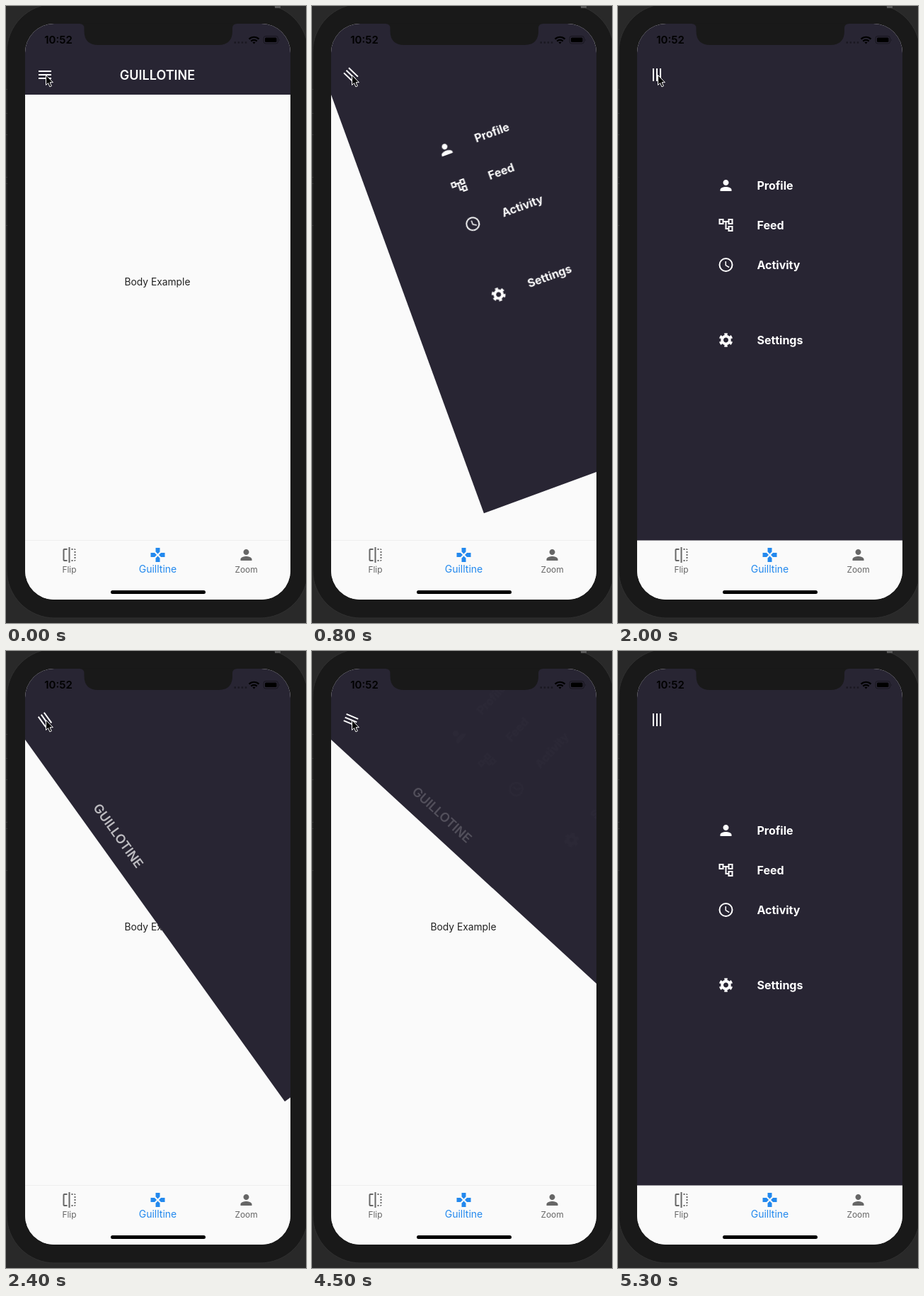
Recreate the animation shown at these times as an HTML page. Size 424 by 870 pixels, loop 5.8 s.

```html
<!DOCTYPE html>
<html lang="en">
<head>
<meta charset="utf-8">
<title>Guillotine menu</title>
<style>
html, body { margin: 0; width: 100%; height: 100%; overflow: hidden; background: #292929; }
svg { display: block; font-family: Inter, Roboto, sans-serif; }
.mid { text-anchor: middle; }
.items { fill: #fff; font-size: 16px; font-weight: 700; }
.tab { fill: #666; font-size: 11.9px; }
</style>
</head>
<body>
<svg width="424" height="870" viewBox="0 0 424 870">
  <defs>
    <clipPath id="screen"><rect x="27" y="25" width="375" height="812" rx="41"/></clipPath>
    <!-- icons are centred on the origin -->
    <path id="person" transform="translate(-12 -12)" d="M12 12c2.21 0 4-1.79 4-4s-1.79-4-4-4-4 1.79-4 4 1.79 4 4 4zm0 2c-2.67 0-8 1.34-8 4v2h16v-2c0-2.66-5.33-4-8-4z"/>
    <path id="tree" transform="translate(-12 -12)" d="M22 11V3h-7v3H9V3H2v8h7V8h2v10h4v3h7v-8h-7v3h-2V8h2v3h7zM7 9H4V5h3v4zm10 6h3v4h-3v-4zm0-10h3v4h-3V5z"/>
    <g id="clock" fill="none" stroke="#fff">
      <circle r="9" stroke-width="2"/>
      <path d="M-.25-5V.6L4.6 3.5" stroke-width="1.5"/>
    </g>
    <g id="gear" fill="none" stroke="#fff">
      <circle r="5.4" stroke-width="3.8"/>
      <circle r="8.2" stroke-width="3.2" pathLength="12" stroke-dasharray="1 1" stroke-dashoffset="-.5"/>
    </g>
    <path id="gamepad" transform="translate(-12 -12)" d="M15 7.5V2H9v5.5l3 3 3-3zM7.5 9H2v6h5.5l3-3-3-3zM9 16.5V22h6v-5.5l-3-3-3 3zM16.5 9l-3 3 3 3H22V9h-5.5z"/>
    <path id="flip" transform="translate(-12 -12)" d="M15 21h2v-2h-2v2zm4-12h2V7h-2v2zM3 5v14c0 1.1.9 2 2 2h4v-2H5V5h4V3H5c-1.1 0-2 .9-2 2zm16-2v2h2c0-1.1-.9-2-2-2zm-8 20h2V1h-2v22zm8-6h2v-2h-2v2zM15 5h2V3h-2v2zm4 8h2v-2h-2v2zm0 8c1.1 0 2-.9 2-2h-2v2z"/>
  </defs>

  <rect width="424" height="870" fill="#292929"/>
  <rect x="1" y="-3" width="426" height="866" rx="68" fill="#191919" stroke="#303030"/>
  <path d="M0 117.5h2M0 151.5h2M0 181.5h2M0 241.5h2M0 250.5h2M0 309.5h2" stroke="#3a3a3a"/>
  <rect x="380" width="8" height="3" fill="#555"/>

  <g clip-path="url(#screen)">
    <rect x="27" y="25" width="375" height="812" fill="#fafafa"/>
    <text class="mid" x="214" y="394" font-size="13.8" fill="#212121">Body Example</text>
    <path d="M27 753.5h375" stroke="#eee"/>
    <g id="panel">
      <rect x="27" y="25" width="375" height="728.5" fill="#282533"/>
      <text id="title" class="mid" transform="rotate(90 27 125)" x="214" y="103.5" font-size="18" font-weight="600" fill="#fff">GUILLOTINE</text>
      <g id="items" class="items">
        <use href="#person" x="152.5" y="253"/><text x="196.5" y="259">Profile</text>
        <use href="#tree" x="152.5" y="309"/><text x="196.5" y="315">Feed</text>
        <use href="#clock" x="152.5" y="365"/><text x="196.5" y="371">Activity</text>
        <use href="#gear" x="152.5" y="471"/><text x="196.5" y="477">Settings</text>
      </g>
    </g>
    <path id="burger" d="M46 92h18M46 97h18M46 102h18" stroke="#fff" stroke-width="2"/>

    <rect x="27" y="754" width="375" height="83" fill="#fafafa"/>
    <g class="tab mid">
      <use href="#flip" x="89.5" y="774"/><text x="89.5" y="799">Flip</text>
      <use href="#person" x="339.5" y="774"/><text x="339.5" y="799">Zoom</text>
      <g fill="#2389ee"><use href="#gamepad" x="214.5" y="774"/><text x="214.5" y="798.5" font-size="14">Guilltine</text></g>
    </g>
    <rect x="148" y="824" width="134" height="5" rx="2.5"/>

    <text class="mid" x="74" y="53" font-size="15" font-weight="600">10:52</text>
    <path d="M322.5 51.5h18" stroke="#000" stroke-opacity=".35" stroke-width="2.5" stroke-dasharray="2.5 2.6"/>
    <g fill="none" stroke="#000" stroke-width="2.2">
      <path d="M343.5 46.6a10 10 0 0 1 14 0M346.3 49.6a6 6 0 0 1 8.4 0"/>
      <path d="M348.5 51.3a3 3 0 0 1 4 0l-2 2.2z" fill="#000" stroke="none"/>
    </g>
    <rect x="364" y="42.5" width="20.5" height="10.5" rx="3" fill="none" stroke="#000" stroke-opacity=".4"/>
    <rect x="366" y="44.5" width="16.5" height="6.5" rx="1.5"/>
    <path d="M386 46v4q1.5-2 0-4z" fill-opacity=".45"/>
  </g>
  <path d="M104 24.5v.5q6.500 0 6.500 6.500V35q0 20 20 20H300q20 0 20-20V31.500q0-6.500 6.500-6.500v-.5z" fill="#191919"/>
  <path id="cursor" d="M56.500 97.500v14l3.100-2.900 2.300 5.300 2.500-1.100-2.300-5.100h4.300z" stroke="#fff"/>
</svg>
<script>
const el = id => document.getElementById(id);
const clamp = x => Math.min(1, Math.max(0, x));

function bounceOut(t) {
  if (t < 1 / 2.75) return 7.5625 * t * t;
  const [shift, base] = t < 2 / 2.75 ? [1.5, .75] : t < 2.5 / 2.75 ? [2.25, .9375] : [2.625, .984375];
  t -= shift / 2.75;
  return 7.5625 * t * t + base;
}

// cubic-bezier(.25, .1, .25, 1)
function ease(x) {
  const bezier = (a, b, s) => 3 * a * s * (1 - s) ** 2 + 3 * b * s * s * (1 - s) + s ** 3;
  let lo = 0, hi = 1;
  for (let i = 0; i < 24; i++) {
    const mid = (lo + hi) / 2;
    if (bezier(.25, .25, mid) < x) lo = mid; else hi = mid;
  }
  return bezier(.1, 1, lo);
}

// How far the menu has opened, 0 to 1, before easing
function phase(t) {
  if (t < 400) return 0;
  if (t < 2000) return clamp((t - 314) / 1000);
  if (t < 4400) return clamp(1 - (t - 2003) / 1000);
  return clamp((t - 4250) / 1000);
}

function draw(now) {
  const t = Math.floor(now % 5800 / 100) * 100;
  const v = phase(t);
  const closing = t >= 2000 && t < 4400;
  const swing = closing ? v : bounceOut(v);
  const title = 1 - ease(clamp(closing ? 2 * v - 1 : 2 * v));
  el("panel").setAttribute("transform", `rotate(${90 * (swing - 1)} 27 125)`);
  el("burger").setAttribute("transform", `rotate(${90 * v} 55 97)`);
  el("title").setAttribute("opacity", title);
  el("items").setAttribute("opacity", clamp(1 - 5 * title));
  el("cursor").setAttribute("opacity", t < 5300 ? 1 : 0);
}

const start = performance.now();
function tick() {
  draw(performance.now() - start);
  requestAnimationFrame(tick);
}
tick();
</script>
</body>
</html>
```
